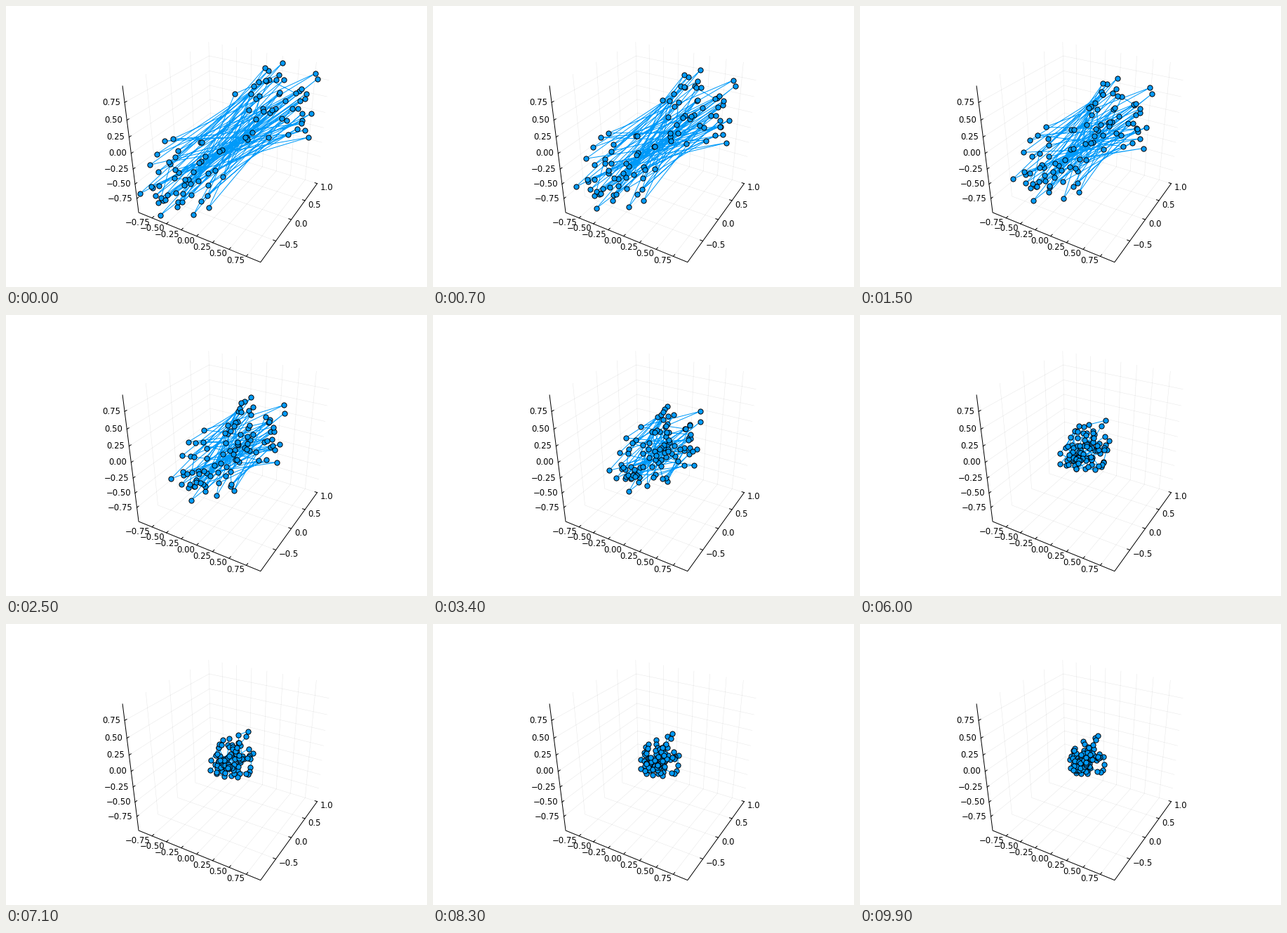
A matplotlib script that plays this animation: 600x400 px, repeating every 10000 ms.

```python
import numpy as np
import matplotlib.pyplot as plt
from matplotlib.animation import FuncAnimation

W, H, DPI = 600, 400, 100
FRAMES, INTERVAL = 100, 100
PX = 72 / DPI
BLUE = "#009AF9"
rng = np.random.default_rng(12)

fig = plt.figure(figsize=(W / DPI, H / DPI), dpi=DPI, facecolor="white")
ax = fig.add_axes([0, 0, 1, 1])
ax.set_xlim(0, W)
ax.set_ylim(H, 0)
ax.axis("off")

# --- perspective camera at azimuth 30, elevation 30 ---
COS, SIN = np.cos(np.pi / 6), np.sin(np.pi / 6)
RIGHT = np.array([COS, SIN, 0])
UP = np.array([-SIN * SIN, COS * SIN, COS])
EYE = np.array([SIN * COS, -COS * COS, SIN])
CX, CY, FOCAL, DIST = 322, 191.9, 660, 6.6


def project(p):
    p = np.asarray(p, float)
    scale = FOCAL / (DIST - p @ EYE)
    return np.array([CX + scale * (p @ RIGHT), CY - scale * (p @ UP)])


def unproject(xy):
    """Stage pixels to the plane through the box centre, facing the camera."""
    x, y = np.asarray(xy, float).T * DIST / FOCAL
    x0, y0 = CX * DIST / FOCAL, CY * DIST / FOCAL
    return np.outer(x - x0, RIGHT) + np.outer(y0 - y, UP)


# --- box, grid, ticks and labels ---
def stroke(*pts, **style):
    xy = np.array([project(p) for p in pts])
    ax.plot(xy[:, 0], xy[:, 1], **style)


def label(value, digits, x, y, ha):
    text = f"{value:.{digits}f}".replace("-", "\u2212")
    ax.text(x, y, text, ha=ha, va="center", fontsize=8.4,
            family="DejaVu Sans", color="black", zorder=2)


grid = dict(color="black", alpha=0.09, lw=0.55 * PX, zorder=0)
edge = dict(color="black", lw=PX, zorder=1)
TICK = 0.04

for v in np.arange(-3, 4) / 4:
    n = 0.02 + 1.03 * v
    stroke((n, -1, -1), (n, 1, -1), (n, 1, 1), **grid)
    stroke((n, -1, -1), (n, -1 + TICK, -1), **edge)
    x, y = project((n, -1, -1))
    label(v, 2, x - 2.5, y + 6.5, "right")

    n = 0.0145 + 1.014 * v
    stroke((-1, -1, n), (-1, 1, n), (1, 1, n), **grid)
    stroke((-1, -1, n), (-1, -1 + TICK, n), **edge)
    x, y = project((-1, -1, n))
    label(v, 2, x - 6, y, "right")

for v in (-0.5, 0.0, 0.5, 1.0):
    n = -0.03 + 1.03 * v
    stroke((1, n, -1), (-1, n, -1), (-1, n, 1), **grid)
    stroke((1, n, -1), (1 - TICK, n, -1), **edge)
    x, y = project((1, n, -1))
    label(v, 1, x + 4.5, y + 6.2, "left")

stroke((-1, -1, 1), (-1, -1, -1), (1, -1, -1), (1, 1, -1), **edge)


# --- two opposite octants of random points, plus a few outermost ones ---
def cloud(sign, outer, total=50):
    inner = sign * rng.uniform(0.03, 0.93, (total - len(outer), 3))
    return rng.permutation(np.vstack([unproject(outer), inner]))


high = cloud(1, [(441, 96), (431, 187), (394, 81), (369, 88),
                 (326, 125), (343, 187)])
low = cloud(-1, [(191, 267), (220, 298), (289, 287), (238, 189),
                 (277, 194)])

# The chain alternates between the clouds, with some pairs swapped.
is_high = np.tile([True, False], 50)
for k in rng.choice(50, 9, replace=False):
    is_high[2 * k:2 * k + 2] = False, True
start = np.empty((FRAMES, 3))
start[is_high], start[~is_high] = high, low


# --- each point is pulled to its neighbours with a capped speed ---
SPEED, SOFT = 0.0137, 0.3


def relax(p):
    q = np.pad(p, ((1, 1), (0, 0)), mode="edge")
    pull = (q[:-2] + q[2:]) / 2 - p
    return p + SPEED * pull / np.hypot(pull, SOFT)


states = [start]
while len(states) < FRAMES:
    states.append(relax(states[-1]))

path, = ax.plot([], [], color=BLUE, lw=PX, zorder=3, solid_joinstyle="round")
dots, = ax.plot([], [], "o", ms=7.2 * PX, mfc=BLUE, mec="black",
                mew=PX, zorder=4)


def update(i):
    x, y = project(states[i])
    path.set_data(x, y)
    dots.set_data(x, y)
    return path, dots


anim = FuncAnimation(fig, update, frames=FRAMES, interval=INTERVAL,
                     repeat=True, repeat_delay=0, blit=False)
plt.show()
```
